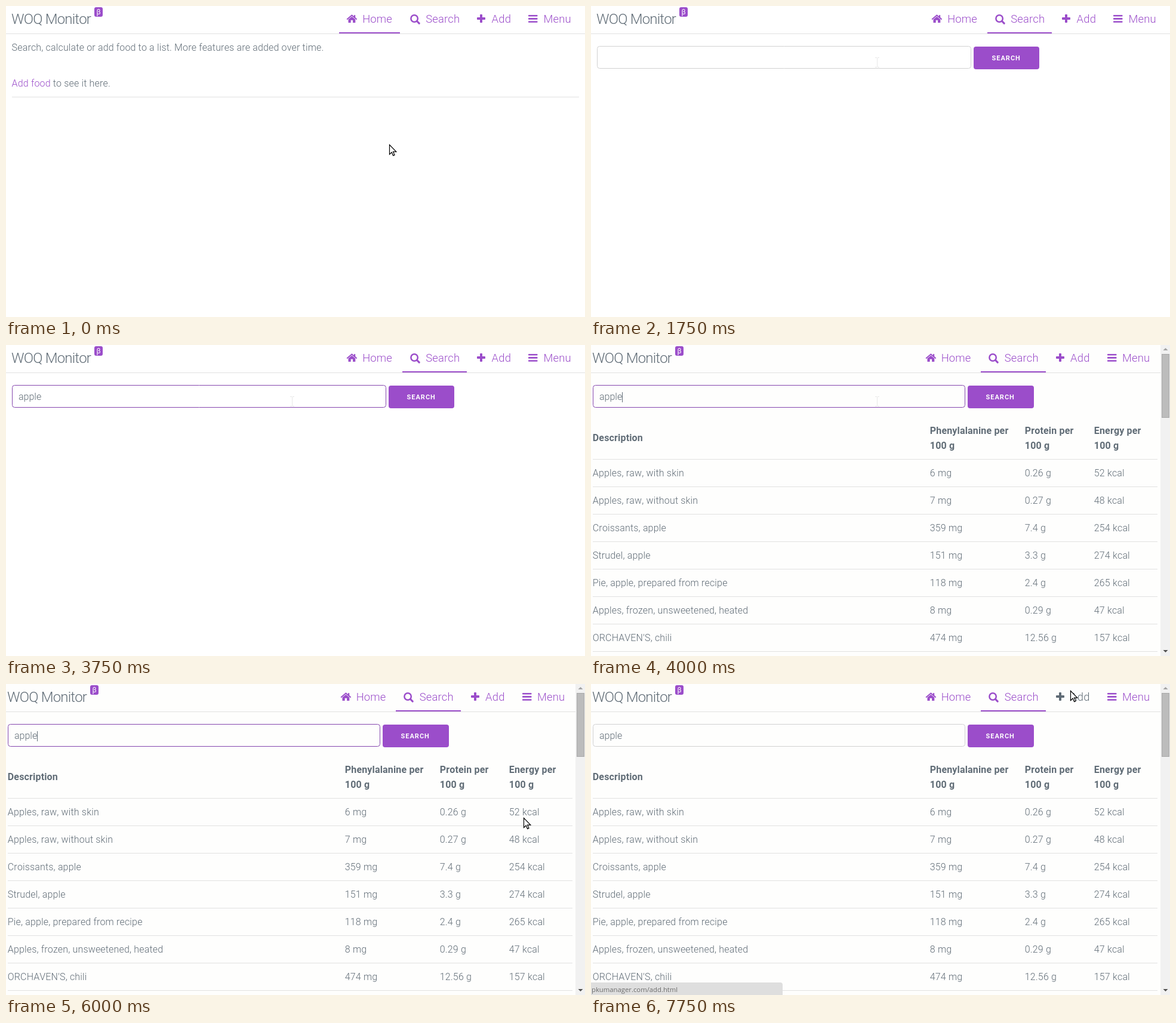
Animation, 970 px wide and 521 px high, one loop 8000 ms. Source, as an HTML page with a canvas:

```html
<!DOCTYPE html>
<html lang="en">
<head>
<meta charset="utf-8">
<title>Food search</title>
<style>
html, body { margin: 0; width: 100%; height: 100%; overflow: hidden; background: #fff; }
canvas { display: block; }
</style>
</head>
<body>
<canvas id="stage" width="970" height="521"></canvas>
<script>
const ctx = document.getElementById('stage').getContext('2d');
const PURPLE = '#9b4dca', GREY = '#606c76', RULE = '#e1e1e1';
const LOOP = 8000, STEP = 250;

const FOODS = [
  ['Apples, raw, with skin', '6 mg', '0.26 g', '52 kcal'],
  ['Apples, raw, without skin', '7 mg', '0.27 g', '48 kcal'],
  ['Croissants, apple', '359 mg', '7.4 g', '254 kcal'],
  ['Strudel, apple', '151 mg', '3.3 g', '274 kcal'],
  ['Pie, apple, prepared from recipe', '118 mg', '2.4 g', '265 kcal'],
  ['Apples, frozen, unsweetened, heated', '8 mg', '0.29 g', '47 kcal'],
  ["ORCHAVEN'S, chili", '474 mg', '12.56 g', '157 kcal']
];
const COLUMNS = [2.8, 567.8, 726.8, 842.8];

// Pointer: time, kind, x, y
const POINTER = [
  [0, 'arrow', 642, 232], [250, 'arrow', 668, 150], [500, 'hand', 706, 28],
  [750, 'hand', 702, 14], [1250, 'beam', 600, 94], [1500, 'beam', 525, 94],
  [1750, 'beam', 479, 94], [4500, 'arrow', 474, 118], [4750, 'arrow', 466, 150],
  [5000, 'arrow', 463, 170], [5250, 'arrow', 640, 215], [5500, 'arrow', 787, 237],
  [5750, 'arrow', 850, 232], [6000, 'arrow', 867, 224], [6250, 'arrow', 866, 150],
  [6500, 'arrow', 842, 60], [6750, 'hand', 806, 3], [7000, 'hand', 804, 10],
  [7750, 'arrow', 803, 11]
];
const TYPED = [[2500, 'a'], [2750, 'app'], [3000, 'appl'], [3250, 'apple']];

const ARROW = new Path2D('M.5 .5V16.5L4.2 13L6.6 18.6L9 17.6L6.6 12.1H11.8Z');
const HAND = new Path2D('M5 14V2Q5 .5 6.5 .5T8 2V8.2Q8.4 6.8 9.8 7T11 8.6Q11.6 7.4 12.8 7.8T13.8 9.4' +
  'Q14.6 8.6 15.6 9.4T16.3 11V15.5Q16 18 14.5 20V22.5H6.5V20Q4 17.5 1 13Q.2 11.3 1.6 10.7T3.6 11.8Z');
const KNUCKLES = new Path2D('M8 8V12M11 8.5V12M13.8 9.4V12');

const latest = (list, t) => list.filter(k => k[0] <= t).pop();

function rect(x, y, w, h, color) {
  ctx.fillStyle = color;
  ctx.fillRect(x, y, w, h);
}

function round(x, y, w, h, r, color) {
  ctx.beginPath();
  ctx.roundRect(x, y, w, h, r);
  ctx.fillStyle = color;
  ctx.fill();
}

function text(str, x, y, o = {}) {
  ctx.font = `${o.weight || 300} ${o.size || 16}px ${o.family || 'Roboto'}, sans-serif`;
  ctx.fontKerning = 'none';
  ctx.letterSpacing = (o.gap ?? 0.16) + 'px';
  ctx.fillStyle = o.color || GREY;
  ctx.fillText(str, x, y);
  return x + ctx.measureText(str).width;
}

function poly(points, color) {
  ctx.beginPath();
  points.forEach(p => ctx.lineTo(...p));
  ctx.fillStyle = color;
  ctx.fill();
}

const ICONS = {
  home(c) {
    ctx.lineWidth = 1.9;
    ctx.stroke(new Path2D('M.7 8L8.4 1.5L16.1 8'));
    rect(11.9, 1.2, 2.3, 4.5, c);
    poly([[2.5, 8.5], [8.4, 3.7], [14.3, 8.5], [14.3, 14], [10.1, 14], [10.1, 9.8],
      [6.7, 9.8], [6.7, 14], [2.5, 14]], c);
  },
  search() {
    ctx.lineWidth = 2.5;
    ctx.beginPath();
    ctx.arc(7.1, 7, 5.7, 0, 7);
    ctx.stroke();
    ctx.lineWidth = 3.1;
    ctx.stroke(new Path2D('M11.6 11.5L15.2 15.1'));
  },
  plus(c) {
    round(0, 5, 14, 4, 1, c);
    round(5, 0, 4, 14, 1, c);
  },
  bars(c) {
    for (let i = 0; i < 3; i++) round(0, 1 + i * 5.1, 15.5, 2.6, 0.8, c);
  }
};

function icon(name, x, color) {
  ctx.save();
  ctx.translate(Math.round(x), 14);
  ctx.strokeStyle = color;
  ctx.lineCap = 'round';
  ICONS[name](color);
  ctx.restore();
}

function header(t, page, wide) {
  const dx = wide ? 0 : -7, nx = wide ? 0 : -10.5;
  text('WOQ Monitor', 9 + dx, 30, { size: 24, gap: -0.8 });
  round(148 + dx, 2, 14, 16, 3, PURPLE);
  text('β', 151.5 + dx, 14, { size: 12, weight: 400, color: '#fff', gap: 0 });

  rect(0, 46, wide ? 970 : 954, 1, RULE);
  if (page === 'home') rect(558, 44, 102, 2, PURPLE);
  else rect(wide ? 664 : 653, 44, wide ? 108 : 109, 2, PURPLE);

  const overSearch = t >= 500 && t < 1250, overAdd = t >= 6750;
  [
    ['home', 'Home', 571.3, 597.2],
    ['search', 'Search', 676.8, 703.2, overSearch],
    ['plus', 'Add', 789.3, 813.6, overAdd],
    ['bars', 'Menu', 875.3, 900.4]
  ].forEach(([name, label, ix, tx, over]) => {
    const color = over ? GREY : PURPLE;
    icon(name, ix + nx, color);
    text(label, tx + nx, 28, { size: 18.4, color });
  });
}

function home() {
  text('Search, calculate or add food to a list. More features are added over time.', 9.6, 75);
  const x = text('Add food', 9.6, 135, { color: PURPLE });
  text(' to see it here.', x, 135);
  rect(10, 152, 950, 1, RULE);
}

function form(t, wide) {
  const x = wide ? 10 : 3, w = wide ? 627 : 624;
  const focus = t >= 2000 && t < 7500;
  ctx.beginPath();
  ctx.roundRect(x + 0.5, 67.5, w - 1, 37, 4);
  ctx.lineWidth = 1;
  ctx.strokeStyle = focus ? '#8546ae' : '#d1d1d1';
  ctx.stroke();

  const typed = latest(TYPED, t);
  const end = text(typed ? typed[1] : '', x + 11, 92, { gap: 0 });
  const typing = t >= 2500 && t < 3750;
  if (focus && (typing || t % 1000 < 500)) rect(Math.round(end), 79, 1, 17, GREY);

  const bx = wide ? 641 : 631;
  round(bx, 68, wide ? 110 : 111, 38, 4, PURPLE);
  text('SEARCH', bx + 30.5, 91, { size: 11, weight: 700, color: '#fff', gap: 1 });
}

function table() {
  const bold = { weight: 700 };
  text('Description', COLUMNS[0], 161, bold);
  ['Phenylalanine per', 'Protein per', 'Energy per'].forEach((head, i) => {
    text(head, COLUMNS[i + 1], 149, bold);
    text('100 g', COLUMNS[i + 1], 174, bold);
  });
  rect(3, 191, 946, 1, RULE);
  FOODS.forEach((food, r) => {
    food.forEach((cell, c) => text(cell, COLUMNS[c], 220 + r * 46));
    rect(3, 237 + r * 46, 946, 1, RULE);
  });
}

function scrollbar() {
  rect(954, 0, 16, 521, '#f1f1f1');
  rect(956, 15, 13, 107, '#a8a8a8');
  rect(957, 16, 11, 105, '#bcbcbc');
  poly([[958.5, 9], [962.5, 5], [966.5, 9]], '#a3a3a3');
  poly([[958.5, 511], [962.5, 515], [966.5, 511]], '#505050');
}

function status(url) {
  round(-1, 500, 322, 22, [0, 4, 0, 0], '#dedede');
  text(url, 1, 516, { size: 11.3, weight: 400, family: '"Open Sans"', color: '#6c6c6c', gap: 0 });
}

function pointer(t) {
  const [, kind, x, y] = latest(POINTER, t);
  ctx.save();
  ctx.translate(x, y);
  ctx.lineWidth = 1.2;
  ctx.fillStyle = '#fff';
  ctx.strokeStyle = '#000';
  if (kind === 'beam') {
    ctx.lineWidth = 1;
    ctx.strokeStyle = '#e8e8e8';
    ctx.stroke(new Path2D('M.5 -7V8M-3 -7.5H0M1 -7.5H4M-3 8.5H0M1 8.5H4'));
  } else {
    const shape = kind === 'hand' ? HAND : ARROW;
    ctx.fill(shape);
    ctx.stroke(shape);
    if (kind === 'hand') ctx.stroke(KNUCKLES);
  }
  ctx.restore();
}

function draw(t) {
  const page = t < 1000 ? 'home' : t < 4000 ? 'search' : 'results';
  const wide = page !== 'results';
  rect(0, 0, 970, 521, wide ? '#fff' : '#fefefd');
  header(t, page, wide);
  if (page === 'home') home();
  else form(t, wide);
  if (!wide) {
    table();
    scrollbar();
  }
  if (t >= 750 && t < 1000) status('pkumanager.com/search.html');
  if (t >= 7000) status('pkumanager.com/add.html');
  pointer(t);
}

const start = performance.now();
function tick() {
  const t = (performance.now() - start) % LOOP;
  draw(Math.floor(t / STEP) * STEP);
  requestAnimationFrame(tick);
}
tick();
</script>
</body>
</html>
```
